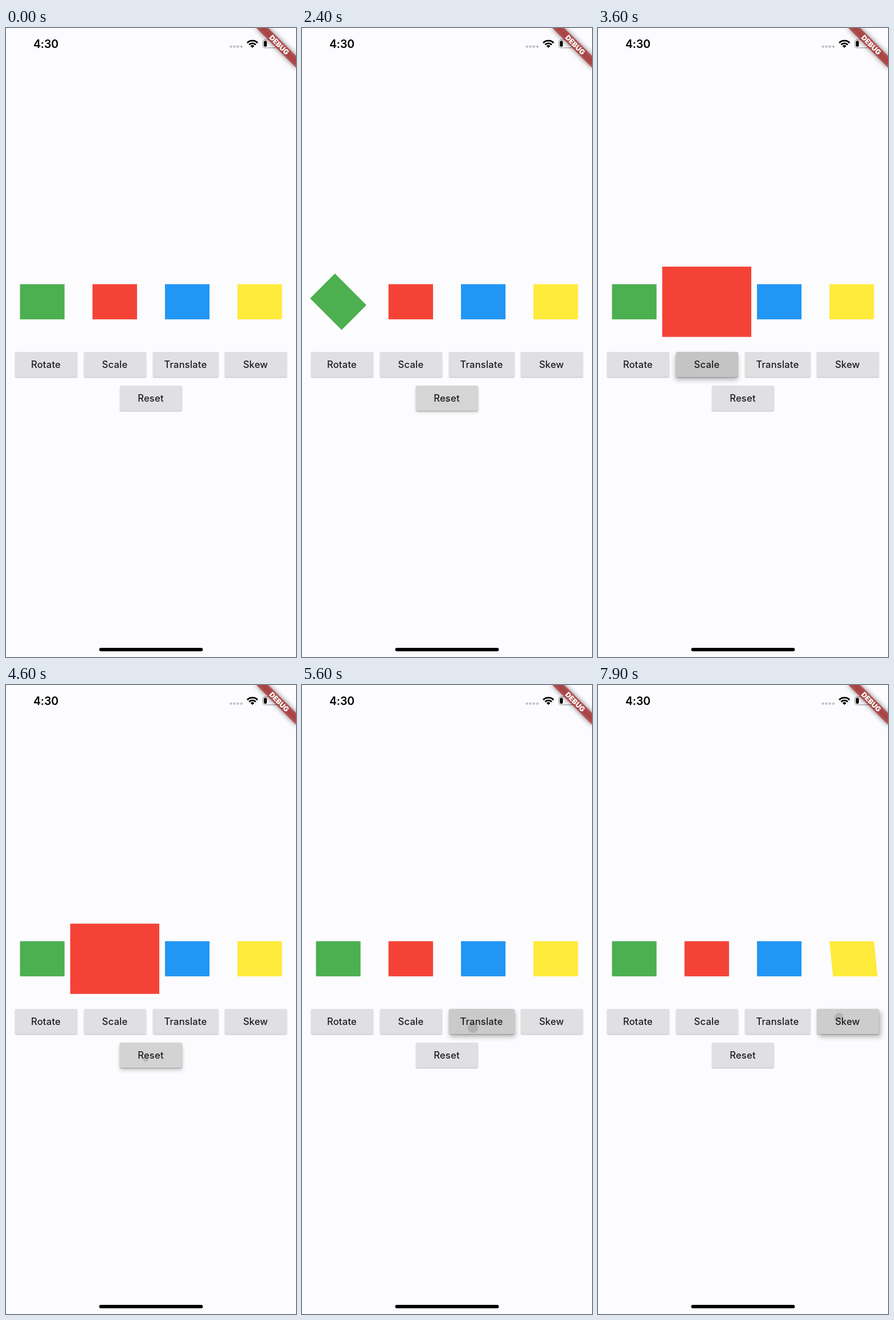
These frames come from a looping animation (509x1101 px, 8 s). An HTML page:

```html
<!DOCTYPE html>
<html lang="en">
<head>
<meta charset="utf-8">
<title>Transform demo</title>
<style>
  html, body { margin: 0; width: 100%; height: 100%; overflow: hidden; background: #fcfbfe; }
  #stage { position: absolute; left: 0; top: 0; width: 509px; height: 1101px; overflow: hidden; font-family: Inter, Roboto, sans-serif; }
  svg { position: absolute; left: 0; top: 0; }
  .button {
    position: absolute; box-sizing: border-box; height: 44px; padding-right: 1px; border-radius: 2.5px;
    color: #1d1b1f; font-size: 16.6px; font-weight: 500; letter-spacing: .2px; line-height: 44px; text-align: center;
  }
</style>
</head>
<body>
<div id="stage">
  <svg id="boxes" width="509" height="1101"></svg>
  <div id="buttons"></div>
  <svg width="509" height="1101">
    <defs>
      <filter id="soft" x="-30%" y="-150%" width="160%" height="400%"><feGaussianBlur stdDeviation="4.9"/></filter>
    </defs>
    <text x="48" y="35" font-size="19.6" font-weight="600" letter-spacing="-.2">4:30</text>
    <g fill="#c5c4c7">
      <circle cx="394.8" cy="32.5" r="2.3"/><circle cx="401" cy="32.5" r="2.3"/>
      <circle cx="407.1" cy="32.5" r="2.3"/><circle cx="413.2" cy="32.5" r="2.3"/>
    </g>
    <g transform="translate(432.5 34.8)" fill="none" stroke="#000" stroke-width="2.9">
      <path d="M-9.1-8.8A12.7 12.7 0 0 1 9.1-8.8"/>
      <path d="M-5.8-5.5A8.1 8.1 0 0 1 5.8-5.5"/>
      <path d="M0 0L-3.4-3.3A4.8 4.8 0 0 1 3.4-3.3Z" fill="#000" stroke="none"/>
    </g>
    <rect x="450.8" y="20.7" width="29" height="14" rx="4" fill="none" stroke="#a3a2a5" stroke-width="1.2"/>
    <path d="M481.3 25.2a3 3 0 0 1 0 5z" fill="#a3a2a5"/>
    <rect x="452.6" y="22.6" width="5.2" height="10.2" rx="1.8"/>
    <g transform="translate(509 0) rotate(45)">
      <rect x="-49.2" y="34.4" width="98.4" height="14.8" opacity=".5" filter="url(#soft)"/>
      <rect x="-49.2" y="34.4" width="98.4" height="14.8" fill="#b71c1c" fill-opacity=".627"/>
      <text y="46.2" font-size="12.3" font-weight="900" fill="#fff" text-anchor="middle">DEBUG</text>
    </g>
    <rect x="163.5" y="1085" width="182" height="6" rx="3"/>
  </svg>
</div>
<script>
const LOOP = 8000, STEP = 100;
const BOX_W = 78.2, BOX_H = 61.5, BOX_Y = 479.2;
const REST = 224;

// colour, transform once its button is tapped
const boxes = [
  ['#4caf50', 'rotate(45)'],
  ['#f44336', 'scale(2)'],
  ['#2196f3', 'translate(61.5 61.5)'],
  ['#ffeb3b', `translate(${BOX_H * .05} 0) skewX(5.71)`]
].map(([color, move], i) => {
  const el = document.createElementNS('http://www.w3.org/2000/svg', 'rect');
  const set = { x: -BOX_W / 2, y: -BOX_H / 2, width: BOX_W, height: BOX_H, fill: color };
  for (const key in set) el.setAttribute(key, set[key]);
  document.getElementById('boxes').append(el);
  return { el, move, home: `translate(${509 / 8 * (2 * i + 1)} ${BOX_Y})` };
});

const buttons = [
  ['Rotate', 16, 567, 109], ['Scale', 137, 567, 109], ['Translate', 258, 567, 115],
  ['Skew', 384, 567, 109], ['Reset', 200, 626, 109]
].map(([label, x, y, w]) => {
  const el = document.createElement('div');
  el.className = 'button';
  el.textContent = label;
  Object.assign(el.style, { left: x + 'px', top: y + 'px', width: w + 'px' });
  document.getElementById('buttons').append(el);
  return { el, x, y, tilt: (x + w / 2 - 254.5) / 50 };
});
const RESET = 4;

// press steps: [grey level, lift, ripple radius]
const release = [[207, .5, 0], [217, .12, 0]];
const held = [202, 1, 9];
const taps = [
  { button: 0, at: 1500, hit: 0, steps: [[194, 1, 0], ...release] },
  { button: RESET, at: 2400, hit: 1, dot: [254, 652], steps: [[214, .5, 3.5], held, ...release] },
  { button: 1, at: 3400, hit: 2, dot: [190, 595], steps: [[214, .5, 3.5], held, [196, 1, 0], ...release] },
  { button: RESET, at: 4600, hit: 1, dot: [245, 655], steps: [[212, .75, 4.5], held, ...release] },
  { button: 2, at: 5500, hit: 2, dot: [300, 600], steps: [[214, .5, 4], held, [196, 1, 0], ...release] },
  { button: RESET, at: 6800, hit: 1, dot: [279.5, 652], steps: [[217, .25, 2.5], held, ...release] },
  { button: 3, at: 7800, hit: 1, dot: [423, 582], steps: [[214, .5, 4], [205, 1, 8]] }
];

function paintButton(b, [grey, lift, radius], dot) {
  const style = b.el.style;
  const gloss = radius
    ? `radial-gradient(circle at ${dot[0] - b.x}px ${dot[1] - b.y}px, rgba(0,0,0,.12) ${radius - .5}px, transparent ${radius + .5}px)`
    : 'none';
  style.backgroundColor = `rgb(${grey},${grey - (grey > 210 ? 1 : 0)},${grey + (grey > 220 ? 1 : 0)})`;
  style.backgroundImage = gloss;
  style.boxShadow = `0 1px 2px rgba(0,0,0,.28), ${b.tilt * lift}px ${1 + 4 * lift}px ${2 + 7 * lift}px rgba(0,0,0,${.28 * lift})`;
}

function draw(time) {
  const now = Math.floor(time / STEP) * STEP;
  let moved = -1, last = null;
  for (const tap of taps) {
    if (now < tap.at) break;
    last = tap;
    if (now >= tap.at + tap.hit * STEP) moved = tap.button;
  }
  boxes.forEach((box, i) =>
    box.el.setAttribute('transform', box.home + (i === moved ? ' ' + box.move : '')));
  buttons.forEach((b, i) => {
    if (!last || last.button !== i) return paintButton(b, [REST, 0, 0]);
    const step = Math.min((now - last.at) / STEP, last.steps.length - 1);
    paintButton(b, last.steps[step], last.dot);
  });
}

const start = performance.now();
function tick() {
  draw((performance.now() - start) % LOOP);
  requestAnimationFrame(tick);
}
tick();
</script>
</body>
</html>
```
